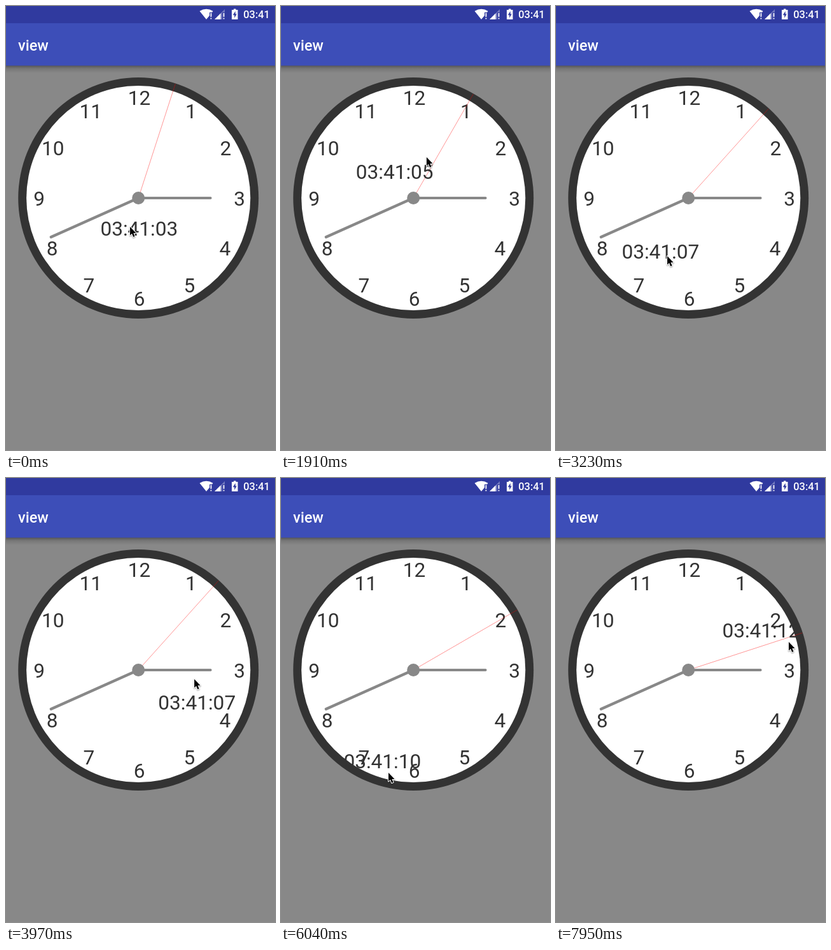
Animation of 423x696 px, one loop 8000 ms. Source, as an HTML page with a canvas:

```html
<!DOCTYPE html>
<html lang="en">
<head>
<meta charset="utf-8">
<title>view</title>
<style>
  html, body { margin: 0; width: 100%; height: 100%; overflow: hidden; background: #888; }
  canvas { display: block; width: 423px; height: 696px; }
</style>
</head>
<body>
<canvas id="stage"></canvas>
<script>
const W = 423, H = 696, LOOP = 8000, STEP = 147.1;
const CX = 208.2, CY = 301;
const FONT = 'Roboto, "Noto Sans", sans-serif';
const DIGITS = 31.6;
const SECOND = 978, FIRST_TICK = 100;
const RESTS = [33, 40, 49];   // steps on which the pointer stays still

// Key points of the drag: moving step, x, y.
const DRAG = [
  [-1, 209, 349], [0, 195, 346], [2, 153, 280], [5, 255, 190], [7, 275, 309], [8, 237, 356],
  [11, 150, 285], [14, 262, 235], [16, 206, 357], [17, 165, 362], [19, 105, 300],
  [21, 164, 385], [22, 175, 392], [24, 292, 412], [31, 275, 173], [32, 293, 181],
  [38, 159, 444], [39, 169, 462], [45, 144, 175], [48, 225, 275], [50, 322, 239], [51, 366, 257]
];

const canvas = document.getElementById('stage');
const ratio = window.devicePixelRatio || 1;
canvas.width = W * ratio;
canvas.height = H * ratio;
const ctx = canvas.getContext('2d');
ctx.scale(ratio, ratio);

// Smooth curve through the key points, with slopes taken from the neighbours.
function dragAt(step) {
  const last = DRAG.length - 1;
  const i = Math.max(0, Math.min(last - 1, DRAG.findIndex(p => p[0] > step) - 1 + (step >= DRAG[last][0] ? last + 1 : 0)));
  const a = DRAG[i], b = DRAG[i + 1];
  const before = DRAG[Math.max(0, i - 1)], after = DRAG[Math.min(last, i + 2)];
  const span = b[0] - a[0];
  const u = Math.min(1, (step - a[0]) / span);
  return [1, 2].map(axis => {
    const slopeA = (b[axis] - before[axis]) / (b[0] - before[0]) * span;
    const slopeB = (after[axis] - a[axis]) / (after[0] - a[0]) * span;
    const ease = u * u * (3 - 2 * u);
    return a[axis] + (b[axis] - a[axis]) * ease
      + slopeA * u * (1 - u) ** 2 - slopeB * u * u * (1 - u);
  });
}

function rect(x, y, w, h, fill) {
  ctx.fillStyle = fill;
  ctx.fillRect(x, y, w, h);
}

function disc(r, fill) {
  ctx.fillStyle = fill;
  ctx.beginPath();
  ctx.arc(CX, CY, r, 0, Math.PI * 2);
  ctx.fill();
}

function fillPath(d, fill) {
  ctx.fillStyle = fill;
  ctx.fill(new Path2D(d));
}

function label(text, x, y, size, fill, weight = 400, align = 'left') {
  ctx.font = `${weight} ${size}px ${FONT}`;
  ctx.textAlign = align;
  ctx.fillStyle = fill;
  ctx.fillText(text, x, y);
}

function polar(degrees, radius) {
  const a = degrees * Math.PI / 180;
  return [CX + radius * Math.sin(a), CY - radius * Math.cos(a)];
}

function hand(degrees, length, width, color) {
  ctx.strokeStyle = color;
  ctx.lineWidth = width;
  ctx.lineCap = 'round';
  ctx.beginPath();
  ctx.moveTo(CX, CY);
  ctx.lineTo(...polar(degrees, length));
  ctx.stroke();
}

function exclamation(x) {
  rect(x, 11, 1.8, 6, '#fff');
  rect(x, 18.6, 1.8, 1.9, '#fff');
}

function drawBars() {
  const shade = ctx.createLinearGradient(0, 93.5, 0, 105);
  shade.addColorStop(0, 'rgba(0,0,0,.36)');
  shade.addColorStop(.4, 'rgba(0,0,0,.13)');
  shade.addColorStop(1, 'rgba(0,0,0,0)');
  rect(0, 0, W, H, '#888');
  rect(0, 93, W, 12, shade);
  rect(0, 0, W, 27, '#303a9f');
  rect(0, 27, W, 66.5, '#3d4eb8');
  label('view', 19, 70, 23.5, '#fff', 500);
  label('03:41', 373.3, 19, 16.4, '#fff', 500);

  // wifi, mobile signal, battery
  fillPath('M315 21L304.5 8Q315 1.5 325.5 8L324 10H320V15Z', '#fff');
  exclamation(321.5);
  fillPath('M328 21L344 5V10H340V21Z', 'rgba(255,255,255,.32)');
  fillPath('M328 21L337.5 11.5V21Z', '#fff');
  exclamation(341.6);
  fillPath('M355 6H358V4.5H361.5V6H364.5V21H355Z', '#fff');
  fillPath('M360.7 8L356.8 14.3H359.2V18.8L362.8 12.6H360.7Z', '#303a9f');
}

function drawDial() {
  disc(189, '#333');
  disc(176.1, '#fff');
  for (let hour = 1; hour <= 12; hour++) {
    const [x, y] = polar(hour * 30, 157.5);
    ctx.font = `400 ${DIGITS}px ${FONT}`;
    ctx.textAlign = 'left';
    const ink = ctx.measureText(hour);
    const width = ink.actualBoundingBoxRight + ink.actualBoundingBoxLeft;
    label(hour, x - width / 2, y + 11.5, DIGITS, '#333');
  }
}

function drawPointer([x, y]) {
  const arrow = new Path2D('M0 0V13.5L3 10.8L5.2 16L7.6 15L5.4 9.9H9.6Z');
  ctx.save();
  ctx.translate(x, y);
  ctx.lineJoin = 'round';
  ctx.lineWidth = 2;
  ctx.strokeStyle = '#fff';
  ctx.shadowColor = 'rgba(0,0,0,.4)';
  ctx.shadowBlur = 2 * ratio;
  ctx.shadowOffsetY = ratio;
  ctx.stroke(arrow);
  ctx.shadowColor = 'transparent';
  ctx.fillStyle = '#000';
  ctx.fill(arrow);
  ctx.restore();
}

function draw(time) {
  const step = Math.floor(time / STEP + .08);
  const move = step - RESTS.filter(r => r <= step).length;
  const seconds = 3 + Math.max(0, Math.floor((step * STEP - FIRST_TICK) / SECOND) + 1);
  const [textX, textY] = dragAt(move - 1);   // the label trails the pointer

  drawBars();
  drawDial();
  hand(90, 113.3, 4.2, '#888');
  hand(246, 150.5, 4.2, '#888');
  hand(seconds * 6, 188, .65, 'rgba(255,0,0,.65)');
  disc(10, '#888');
  label('03:41:' + String(seconds).padStart(2, '0'), textX + .3, textY + 11, DIGITS, '#333', 400, 'center');
  drawPointer(dragAt(move));
}

const begin = performance.now();
function tick() {
  draw((performance.now() - begin) % LOOP);
  requestAnimationFrame(tick);
}
tick();
</script>
</body>
</html>
```
